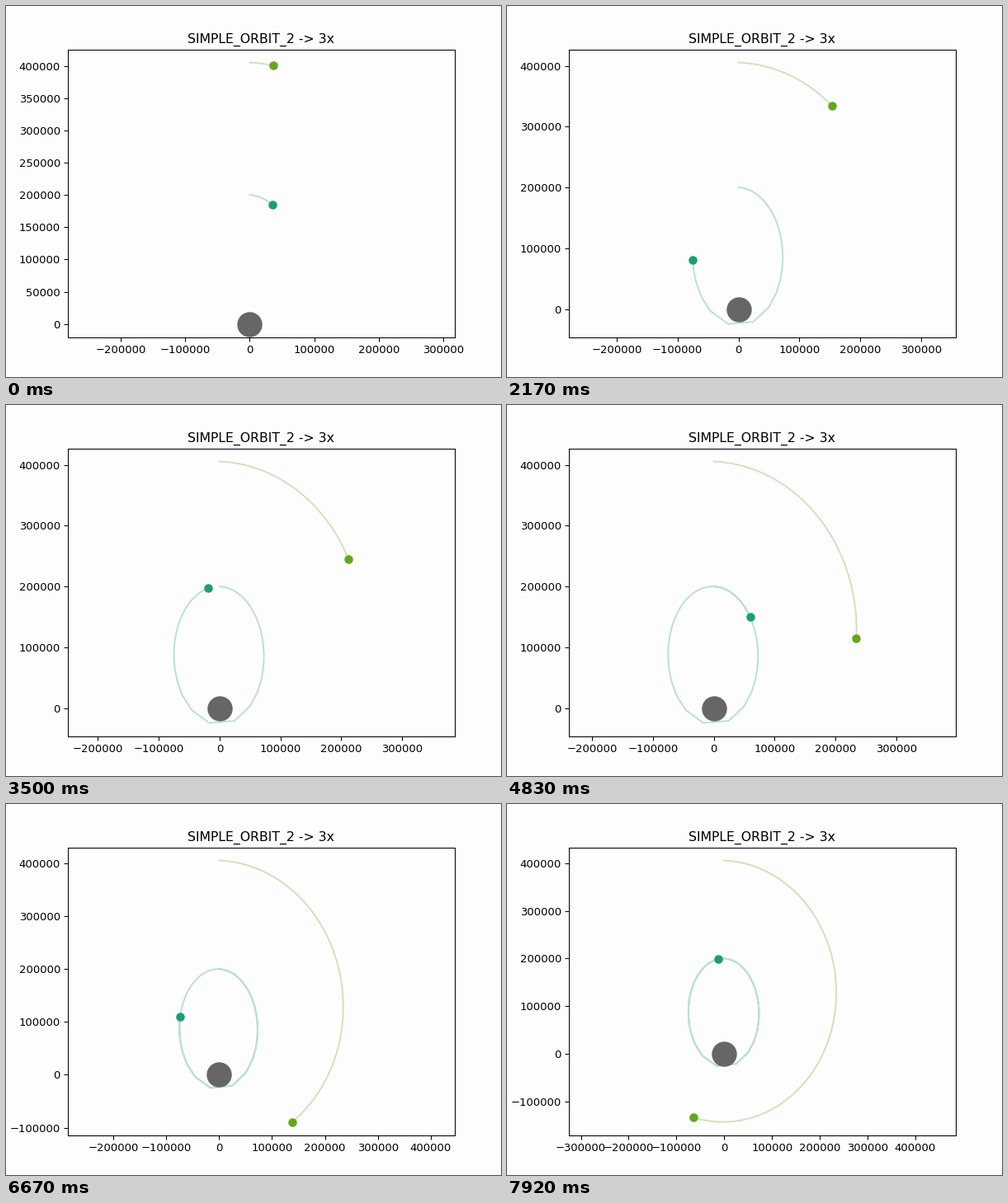
These frames come from a looping animation (600 by 450 pixels, 8 s). A matplotlib script:

```python
import numpy as np
import matplotlib.pyplot as plt
from matplotlib.animation import FuncAnimation

plt.rcParams.update({"font.family": "DejaVu Sans", "font.size": 10.08})

LOOP_MS, INTERVAL_MS = 8000, 40
TICKS_PER_MS = 0.012
TICKS = 96
# Screen ticks on which the simulation stands still, or catches up two steps.
HELD = {2, 5, 7, 9, 13, 19, 25, 31, 37, 41, 47, 53, 59, 65, 73, 79, 83, 89}
DOUBLE = {6, 10, 42}
FIRST_STEP = 6
LEFT, RIGHT, TOP, BOTTOM = 75, 544, 52.7, 401.5
WIDTH, HEIGHT = RIGHT - LEFT, BOTTOM - TOP
BACKGROUND = "#fefdfe"


def kepler_path(start, ecc, phase, rate, count=100):
    """Positions at even time steps, beginning at (0, start) near apoapsis."""
    axis = start / (1 + ecc * np.cos(phase))
    mean = phase + ecc * np.sin(phase) + rate * np.arange(count)
    angle = mean.copy()
    for _ in range(60):
        angle -= (angle + ecc * np.sin(angle) - mean) / (1 + ecc * np.cos(angle))
    along = axis * (ecc + np.cos(angle))
    across = axis * np.sqrt(1 - ecc**2) * np.sin(angle)
    tilt = np.arctan2(across[0], along[0])
    return np.column_stack((across * np.cos(tilt) - along * np.sin(tilt),
                            across * np.sin(tilt) + along * np.cos(tilt)))


advance = [0 if i in HELD else 2 if i in DOUBLE else 1 for i in range(1, TICKS)]
steps = FIRST_STEP + np.concatenate(([0], np.cumsum(advance)))

fig = plt.figure(figsize=(6.4, 4.8), dpi=93.75, facecolor=BACKGROUND)
ax = fig.add_axes([LEFT / 600, 1 - BOTTOM / 450, WIDTH / 600, HEIGHT / 450],
                  facecolor=BACKGROUND)
ax.set_title("SIMPLE_ORBIT_2 -> 3x")
ax.scatter(0, 0, s=500, color="#666666", zorder=3)

bodies = []
for path, color in ((kepler_path(200000, 0.7595, 0.036, 0.1426), "#1b9e77"),
                    (kepler_path(405400, 0.481, 0.073, 0.0371), "#66a61e")):
    trail, = ax.plot([], [], color=color, alpha=0.3, lw=1.5)
    dot = ax.scatter(0, 0, s=50, color=color, zorder=4)
    bodies.append((path, trail, dot))


def fit_view(points):
    """Equal scale on both axes, five percent margin above and below."""
    low, high = points.min(axis=0), points.max(axis=0)
    margin = 0.05 * (high[1] - low[1])
    ax.set_ylim(low[1] - margin, high[1] + margin)
    middle = (low[0] + high[0]) / 2
    half = 0.55 * (high[1] - low[1]) * WIDTH / HEIGHT
    ax.set_xlim(middle - half, middle + half)


def update(frame):
    # Sampling late in the interval keeps each tick from appearing late.
    step = steps[int((frame * INTERVAL_MS + 35) * TICKS_PER_MS)]
    seen = [np.zeros((1, 2))]
    for path, trail, dot in bodies:
        past = path[:step + 1]
        trail.set_data(past[:, 0], past[:, 1])
        dot.set_offsets(past[-1:])
        seen.append(past)
    fit_view(np.vstack(seen))
    return ()


anim = FuncAnimation(fig, update, frames=LOOP_MS // INTERVAL_MS,
                     interval=INTERVAL_MS, repeat=True, repeat_delay=0, blit=False)
plt.show()
```
